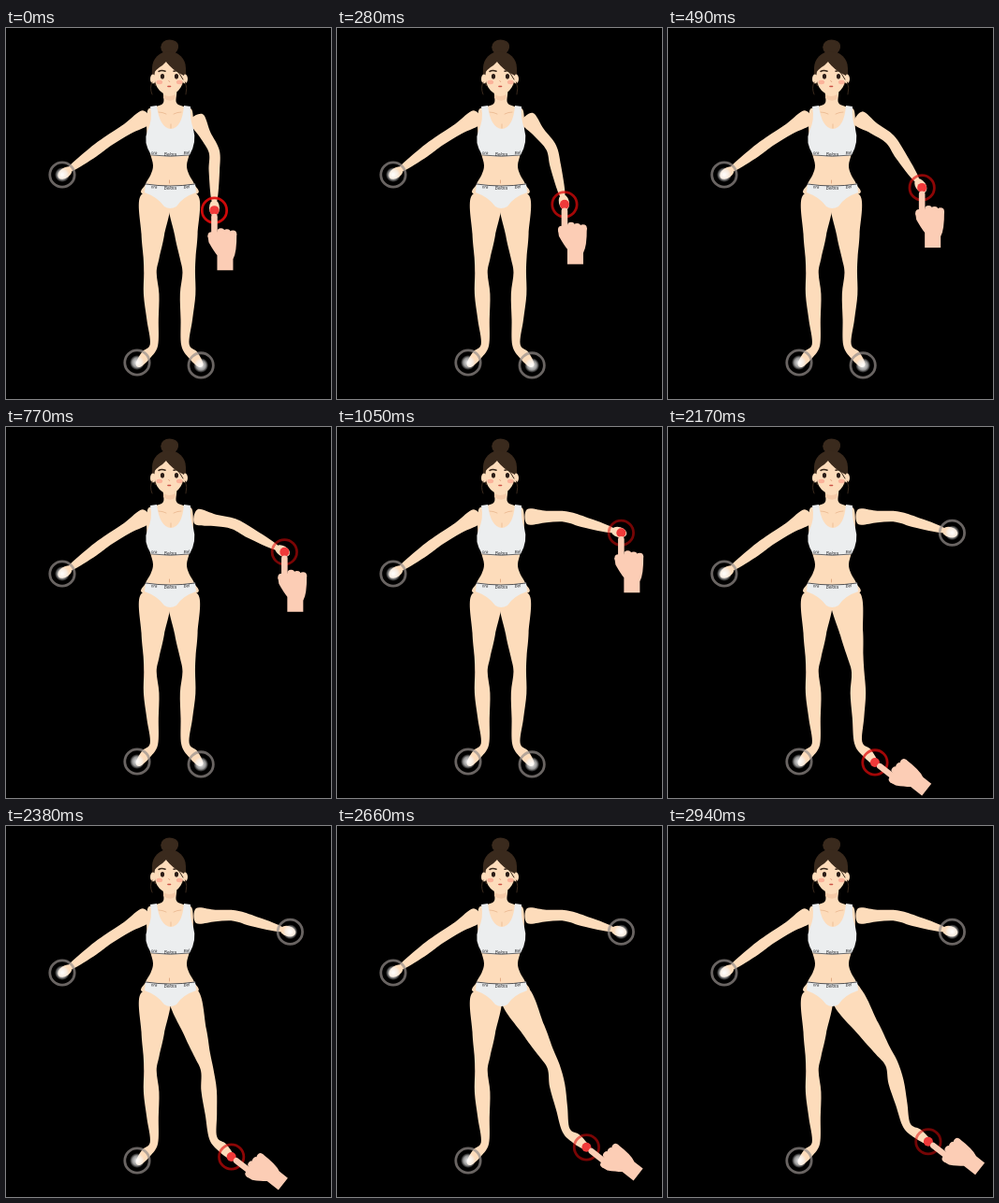
An HTML page with a canvas that plays this animation: 347x397 px, repeating every 3.85 s.

```html
<!DOCTYPE html>
<html lang="en">
<head>
<meta charset="utf-8">
<title>Pose handles</title>
<style>
html, body { margin: 0; width: 100%; height: 100%; overflow: hidden; background: #000; }
canvas { display: block; }
</style>
</head>
<body>
<canvas id="stage" width="347" height="397"></canvas>
<script>
const ctx = document.getElementById('stage').getContext('2d');
const LOOP = 3850, STEP = 70, MOVE = 1050, LEG_START = 1890;
const SKIN = '#fddcbb', HAIR = '#3a2a1d', CLOTH = '#eceeef', INK = '#2d2d30', HAND = '#fccdb5';
const SHOULDER = [203, 96], HIP = [189.5, 180];

const clamp = x => Math.max(0, Math.min(1, x));
const ease = x => x * x * (3 - 2 * x);
const mix = (a, b, k) => a.map((v, i) => v + (b[i] - v) * k);
const mirror = ([x, y]) => [349 - x, y];

function polar([x, y], length, degrees) {
  const a = degrees * Math.PI / 180;
  return [x + length * Math.cos(a), y + length * Math.sin(a)];
}

// Closed smooth shape through the given points
function blob(pts, color) {
  const n = pts.length, at = i => pts[(i + n) % n];
  const handle = (i, dir) => at(i).map((v, k) => v + dir * (at(i + 1)[k] - at(i - 1)[k]) / 6);
  ctx.beginPath();
  ctx.moveTo(...at(0));
  for (let i = 0; i < n; i++) {
    ctx.bezierCurveTo(...handle(i, 1), ...handle(i + 1, -1), ...at(i + 1));
  }
  ctx.fillStyle = color;
  ctx.fill();
}

// Tapered limb along stations of [point, width]
function limb(stations) {
  const left = [], right = [];
  stations.forEach(([[x, y], w], i) => {
    const a = stations[Math.max(0, i - 1)][0];
    const b = stations[Math.min(stations.length - 1, i + 1)][0];
    const k = w / 2 / Math.hypot(b[0] - a[0], b[1] - a[1]);
    const nx = (b[1] - a[1]) * k, ny = (a[0] - b[0]) * k;
    left.push([x + nx, y + ny]);
    right.unshift([x - nx, y - ny]);
  });
  blob([...left, ...right], SKIN);
}

function oval(x, y, rx, ry, color, turn = 0) {
  ctx.beginPath();
  ctx.ellipse(x, y, rx, ry, turn, 0, Math.PI * 2);
  ctx.fillStyle = color;
  ctx.fill();
}

function line(d, color, width) {
  ctx.strokeStyle = color;
  ctx.lineWidth = width;
  ctx.lineCap = 'round';
  ctx.stroke(new Path2D(d));
}

function shape(d, color) {
  ctx.fillStyle = color;
  ctx.fill(new Path2D(d));
}

function arm(shoulder, elbow, pin) {
  const wrist = mix(elbow, pin, 0.83);
  limb([
    [shoulder, 16], [mix(shoulder, elbow, 0.5), 12.5], [elbow, 11.5],
    [mix(elbow, wrist, 0.4), 11.5], [wrist, 6]
  ]);
  const turn = Math.atan2(pin[1] - elbow[1], pin[0] - elbow[0]);
  const [x, y] = mix(elbow, pin, 0.96);
  oval(x, y, 8.5, 5.5, SKIN, turn);
}

function leg(hip, knee, ankle, toe) {
  limb([
    [hip, 31], [mix(hip, knee, 0.5), 24.5], [mix(hip, knee, 0.8), 17], [knee, 13.5],
    [mix(knee, ankle, 0.3), 16.5], [mix(knee, ankle, 0.65), 12.5], [ankle, 8.5],
    [mix(ankle, toe, 0.5), 11], [toe, 6]
  ]);
}

function ring([x, y], color) {
  ctx.beginPath();
  ctx.arc(x, y, 13.2, 0, Math.PI * 2);
  ctx.strokeStyle = color;
  ctx.lineWidth = 2.8;
  ctx.stroke();
}

function pin([x, y]) {
  const glow = ctx.createRadialGradient(x, y, 1, x, y, 8);
  glow.addColorStop(0, 'rgba(255,255,255,.9)');
  glow.addColorStop(0.6, 'rgba(245,245,245,.6)');
  glow.addColorStop(1, 'rgba(235,235,235,0)');
  oval(x, y, 8, 8, glow);
  ring([x, y], 'rgba(150,143,139,.7)');
}

function activePin([x, y], time) {
  oval(x, y, 5, 5, '#f03a3a');
  ring([x, y], `rgba(222,10,10,${0.52 + 0.4 * (1 - time) ** 2})`);
}

function pointer([x, y], degrees, size) {
  ctx.save();
  ctx.translate(x, y);
  ctx.rotate(degrees * Math.PI / 180);
  ctx.scale(size, size);
  line('M0 7V28', HAND, 6.6);
  for (let i = 0; i < 3; i++) oval(7 + 6.4 * i, 23 + 1.2 * i, 4, 4, HAND);
  oval(-3, 27, 4, 4, HAND);
  shape('M-7 27L-6 34Q-1 43 3 48L3 64H20V52Q24 45 23.8 25L3 23Z', HAND);
  ctx.restore();
}

function label(text, x, y, turn = 0) {
  ctx.save();
  ctx.translate(x, y);
  ctx.rotate(turn);
  ctx.font = 'italic 4.6px "Liberation Sans", Arial, sans-serif';
  ctx.textAlign = 'center';
  ctx.fillStyle = INK;
  ctx.fillText(text, 0, 0);
  ctx.restore();
}

function band(y) {
  label('ora', 158, y - 1.5, 0.1);
  label('Belora', 175.5, y);
  label('Bel', 193, y - 1.5, -0.1);
}

function body() {
  // Half widths of the trunk from neck to hip
  const trunk = [[66, 6.5], [80, 7], [85, 17], [89, 24], [114, 24.5], [134, 21], [147, 18], [157, 20.5], [167, 26], [178, 27]];
  const side = dir => trunk.map(([y, half]) => [175 + dir * half, y]);
  blob([...side(-1), ...side(1).reverse()], SKIN);
  shape('M168 71Q174 75 181 71L180 76Q175 80 168 75Z', '#f6cba9');
  line('M163 90Q167 90 171 92M179 92Q183 90 187 90M176 103V107', '#e9b68f', 0.8);
  line('M174.5 163V166', '#e0aa83', 1);

  shape('M154 84L161 83Q164 107 176 108Q188 107 190 83L197 84Q196 97 200 108Q204 122 196 136Q175 139 155 136Q146 122 151 110Q157 98 154 84Z', CLOTH);
  line('M155.5 136Q175 138.5 196 136', INK, 0.7);
  band(136.5);
  shape('M149 166.5Q175 171 202 166.5L203 176Q188 181 182 191Q175 195 169 191Q162 181 148 176Z', CLOTH);
  line('M149 167Q175 171 202 167', INK, 0.8);
  band(173);
}

function head() {
  oval(174.5, 20.5, 9.3, 8, HAIR);
  line('M179 14Q185 16 183 22', HAIR, 1.2);
  oval(174, 43, 18, 18, HAIR);
  shape('M156 43Q155 55 159 62H188Q193 55 192 43Z', HAIR);
  oval(157, 54.5, 3, 5, SKIN);
  oval(191, 54.5, 3, 5, SKIN);
  shape('M159 43Q157 60 164 67Q174 76 184 67Q191 60 189.5 43Q181 33 174 36Q165 34 159 43Z', SKIN);
  shape('M157 50Q160 44 167 40L171 36Q177 45 190 51Q193 43 189 34Q181 25 172 26Q158 29 156 44Z', HAIR);
  line('M156 58Q153 64 156 71M191.5 58Q194 64 192 71M172 37Q182 42 189 55', HAIR, 1);

  line('M163 46.5Q166 44.8 170 46.3M179 46.3Q182.5 44.8 186 46.8', HAIR, 1.5);
  for (const x of [167, 182]) {
    oval(x, 51.8, 2.1, 2.8, '#2b1d17');
    oval(x + (x < 174 ? -3.2 : 3.2), 58, 3.3, 2.2, 'rgba(250,135,120,.5)');
  }
  line('M173.8 56.5L174.6 57.5', '#dc9878', 0.9);
  line('M173 62.5H175.5', '#cc5347', 1.6);
}

function draw(t) {
  const armTime = clamp(t / MOVE), legTime = clamp((t - LEG_START) / MOVE);
  const lift = ease(armTime), swing = ease(legTime);
  const armPin = polar([203, 95], 102, 79 - 68.7 * lift);
  const legPin = polar([186, 178], 184.3, 83.1 - 23 * swing);
  const elbow = polar(SHOULDER, 41, 62 * (1 - lift));
  const knee = polar(HIP, 82 + 7 * swing, 86 - 29.5 * swing);
  const ankle = polar(HIP, 159 - 4 * swing, 89.3 - 24.3 * swing);
  const arming = t < LEG_START;

  ctx.fillStyle = '#000';
  ctx.fillRect(0, 0, 347, 397);

  arm([150, 95], [109, 121], [61, 156.5]);
  arm(SHOULDER, elbow, armPin);
  leg(...[HIP, [195, 262], [191, 339], [208, 361]].map(mirror));
  leg(HIP, knee, ankle, legPin);
  body();
  head();

  pin([60, 157]);
  pin([140, 358]);
  pin(arming ? legPin : armPin);
  if (arming) {
    activePin(armPin, armTime);
    pointer(armPin, 0, 1);
  } else {
    activePin(legPin, legTime);
    pointer(legPin, -52, 0.96);
  }
}

function tick(now) {
  draw(Math.floor((now % LOOP) / STEP) * STEP);
  requestAnimationFrame(tick);
}
draw(0);
requestAnimationFrame(tick);
</script>
</body>
</html>
```
